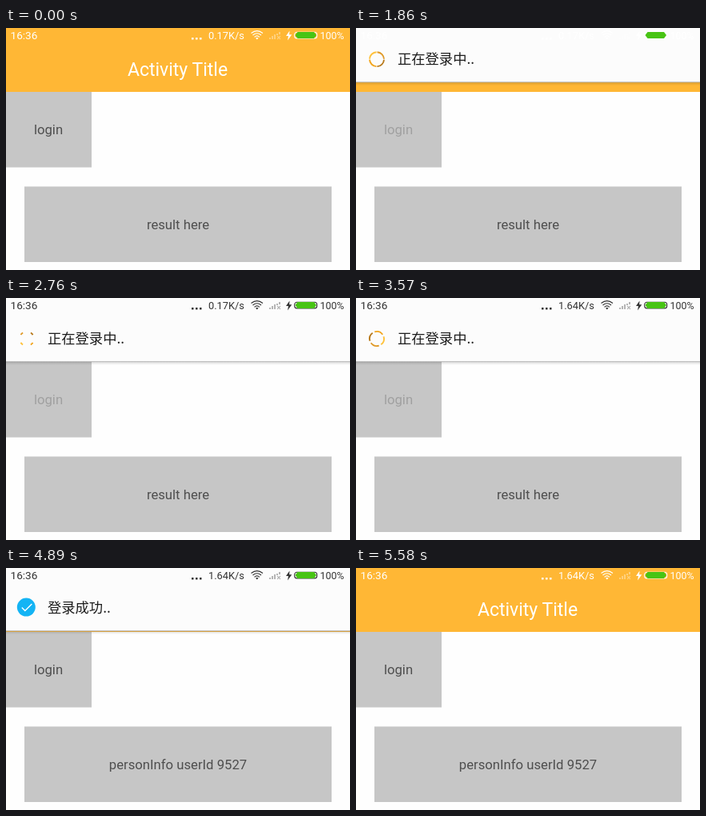
Animation, 430 px wide and 303 px high, one loop 6240 ms. Source, as an HTML page:

```html
<!DOCTYPE html>
<html lang="zh">
<head>
<meta charset="utf-8">
<style>
  html, body { margin: 0; width: 100%; height: 100%; overflow: hidden; background: #fefefe; }
  svg { display: block; width: 430px; height: 303px; font-family: Roboto, sans-serif; }
  .label { font-size: 16.7px; text-anchor: middle; fill: #4e4e4e; }
  .title { font-size: 23px; text-anchor: middle; fill: #fff; }
  .notice { font: 17.3px "Noto Sans CJK SC", "Noto Sans CJK", sans-serif; fill: #1c1c1c; }
  .line { fill: none; stroke: currentColor; stroke-width: 1.1; }
  #status { fill: currentColor; font-size: 12.8px; }
</style>
</head>
<body>
<svg viewBox="0 0 430 303">
  <defs>
    <linearGradient id="shade" x2="0" y2="1">
      <stop stop-color="#000" stop-opacity=".28"/>
      <stop offset=".4" stop-color="#000" stop-opacity=".1"/>
      <stop offset="1" stop-color="#000" stop-opacity="0"/>
    </linearGradient>
  </defs>

  <rect width="430" height="303" fill="#fefefe"/>
  <rect width="430" height="80" fill="#ffb735"/>
  <text class="title" x="214.5" y="59.5">Activity Title</text>
  <rect y="80" width="107" height="94.5" fill="#c6c6c6"/>
  <text class="label" id="login" x="53" y="133">login</text>
  <rect x="23" y="198.5" width="384" height="94.5" fill="#c6c6c6"/>
  <text class="label" id="result" x="215" y="252"></text>

  <g id="panel">
    <rect y="-10" width="430" height="90" fill="#fcfcfc"/>
    <rect y="79" width="430" height="5" fill="url(#shade)"/>
    <g id="spinner" fill="none" stroke-width="1.9"></g>
    <g id="done">
      <circle r="11.5" fill="#14b4f4"/>
      <path id="check" d="M-5.5 .5L-1.5 4.5L7 -4" pathLength="1" fill="none" stroke="#fff" stroke-width="1.4"/>
    </g>
    <text class="notice" id="notice" x="52" y="57"></text>
  </g>

  <g id="status">
    <text x="5.5" y="13.7" font-size="13.6">16:36</text>
    <path d="M232 12h2.5v2.5h-2.5zM237 12h2.5v2.5h-2.5zM242 12h2.5v2.5h-2.5z"/>
    <text id="speed" x="253" y="13.7"></text>
    <path class="line" d="M306.5 6.5Q313.8 .8 321 6.5M308.5 9Q313.8 4.6 319 9M310.5 11.3Q313.8 8.5 317 11.3"/>
    <path d="M312 12.6Q313.8 11.2 315.6 12.6L313.8 14.6z"/>
    <g opacity=".35">
      <path d="M329 14v-2h2v2zM332 14v-4h2v4zM335 14v-6h2v6zM338 9v-2h2v2zM341 8v-3h2v3z"/>
      <path class="line" d="M339 10l4 4M343 10l-4 4"/>
    </g>
    <path d="M354.5 3.5L350 10h3L352 15.5L357.3 8.3h-3.2z"/>
    <rect class="line" x="360.7" y="5.3" width="28" height="7.6" rx="3"/>
    <path d="M361.5 9L364.5 5H385L388 9L385 13H364.5z" fill="#48c414"/>
    <text x="392.5" y="13.7" font-size="12.4">100%</text>
  </g>
</svg>
<script>
  const LOOP = 6240;
  const REQUEST = 1710, SPEED_UPDATE = 3300, RESPONSE = 3630, DISMISS = 4860;
  const HIDDEN = -86;
  const ARC_COLORS = ["#b87a1c", "#f2a51e", "#ffc23c", "#e09a28"];
  const $ = id => document.getElementById(id);
  const progress = (t, from, to) => Math.min(1, Math.max(0, (t - from) / (to - from)));
  const polar = (r, deg) => {
    const a = deg * Math.PI / 180;
    return `${r * Math.cos(a)} ${r * Math.sin(a)}`;
  };
  const setText = (id, value) => {
    if ($(id).textContent !== value) $(id).textContent = value;
  };

  const arcs = ARC_COLORS.map(color => {
    const arc = document.createElementNS($("panel").namespaceURI, "path");
    arc.setAttribute("stroke", color);
    return $("spinner").appendChild(arc);
  });

  function drawSpinner(t) {
    const pulse = 0.5 + 0.5 * Math.cos((t - 1860) / 600 * 2 * Math.PI);
    const half = (24 + 60 * pulse) / 2;
    arcs.forEach((arc, i) => {
      const mid = 45 + i * 90;
      arc.setAttribute("d", `M${polar(9, mid - half)}A9 9 0 0 1 ${polar(9, mid + half)}`);
    });
    const turn = (t - 1860) * 0.3;
    $("spinner").setAttribute("transform", `translate(26 51) rotate(${turn})`);
  }

  function panelOffset(t) {
    const enter = 1 - (1 - progress(t, REQUEST, REQUEST + 240)) ** 2;
    const leave = progress(t, DISMISS, 5040) ** 2.6;
    return HIDDEN * (1 - enter + leave);
  }

  function render(t) {
    const answered = t >= RESPONSE;
    const waiting = t >= REQUEST && !answered;

    $("login").style.fill = waiting ? "#a0a0a0" : "";
    setText("result", answered ? "personInfo userId 9527" : "result here");
    setText("notice", answered ? "登录成功.." : "正在登录中..");
    setText("speed", t < SPEED_UPDATE ? "0.17K/s" : "1.64K/s");

    $("panel").setAttribute("transform", `translate(0 ${panelOffset(t)})`);
    $("spinner").style.display = waiting ? "" : "none";
    if (waiting) drawSpinner(t);

    const pop = 1 - (1 - progress(t, RESPONSE - 30, 3870)) ** 2;
    const drawn = progress(t, 3840, 4110);
    $("done").style.display = answered ? "" : "none";
    $("done").setAttribute("transform", `translate(25.3 50) scale(${pop})`);
    $("check").setAttribute("stroke-dasharray", `${drawn} 2`);
    $("check").style.visibility = drawn ? "" : "hidden";

    const dark = progress(t, 2100, 2400) - progress(t, 5190, 5490);
    const shade = Math.round(255 - 205 * dark);
    $("status").style.color = `rgb(${shade},${shade},${shade})`;
  }

  const start = performance.now();
  function tick() {
    render((performance.now() - start) % LOOP);
    requestAnimationFrame(tick);
  }
  tick();
</script>
</body>
</html>
```
